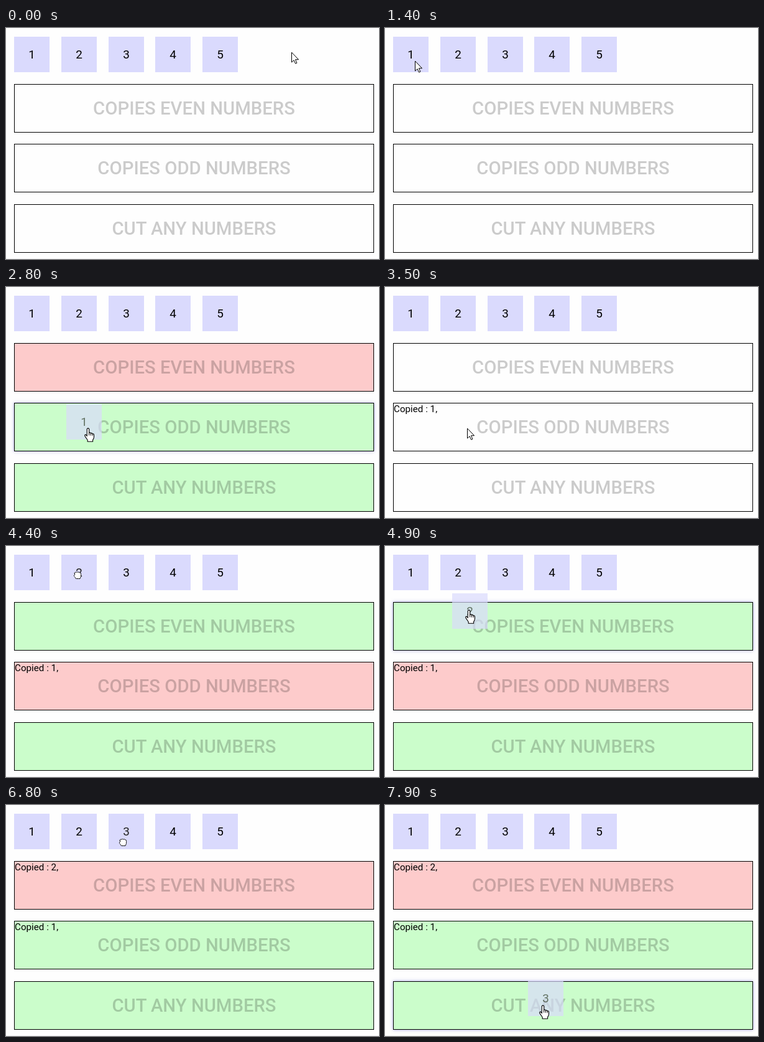
Write an HTML page that moves like this. It is 600x371 px and loops after 8 s.

```html
<!DOCTYPE html>
<html lang="en">
<head>
<meta charset="utf-8">
<title>Drag and drop numbers</title>
<style>
  html, body { margin: 0; width: 100%; height: 100%; overflow: hidden; background: #fefefe; }
  #stage {
    position: relative; width: 600px; height: 371px; overflow: hidden;
    box-sizing: border-box; border-bottom: 1px solid #f5f5f6;
    font-family: Roboto, Arial, sans-serif; cursor: default; user-select: none;
  }
  .cell {
    position: absolute; top: 14px; width: 57px; height: 57px;
    background: #dadafd; color: #000; font-size: 18.9px; line-height: 57px; text-align: center;
  }
  .ghost { left: 0; top: 0; opacity: .68; color: #333; }
  .zone {
    position: absolute; left: 13px; width: 579px; height: 78px;
    box-sizing: border-box; border: 1px solid #000;
  }
  .zone.yes { background: #cbfdcb; }
  .zone.no { background: #fdcbcb; }
  .zone.over { box-shadow: 0 0 5px rgba(90, 90, 210, .5); }
  .title {
    position: absolute; inset: 0; line-height: 76px; text-align: center; white-space: nowrap;
    font-size: 29.3px; font-weight: 500; color: rgba(0, 0, 0, .2);
  }
  .note { position: absolute; left: 0; top: 0; font-size: 15.2px; line-height: 18px; white-space: nowrap; }
  #pointer { position: absolute; left: 0; top: 0; width: 1px; height: 1px; overflow: visible; }
  #pointer path { stroke-linejoin: round; stroke-linecap: round; }
</style>
</head>
<body>
<div id="stage"></div>
<script>
const LOOP = 8000, STEP = 100;
const CELL_X = [13, 89, 165, 240, 316];
const CELL_Y = 14, CELL_SIZE = 57;
const ZONES = [
  { y: 90, title: 'COPIES EVEN NUMBERS', accepts: n => n % 2 === 0 },
  { y: 186, title: 'COPIES ODD NUMBERS', accepts: n => n % 2 === 1 },
  { y: 283, title: 'CUT ANY NUMBERS', accepts: () => true }
];

// Pointer path: time, x, y
const PATH = [
  [0, 459, 39], [100, 452, 62], [300, 395, 190], [500, 290, 312], [600, 215, 250],
  [800, 75, 88], [900, 49, 58], [1100, 48, 52], [1700, 48, 54], [1800, 50, 59],
  [1900, 57, 72], [2100, 80, 115], [2400, 103, 172], [2700, 128, 222], [2800, 132, 227],
  [3500, 132, 227], [3700, 129, 170], [3900, 119, 72], [4100, 116, 41], [4400, 116, 41],
  [4600, 121, 62], [4900, 135, 103], [5200, 140, 122], [5400, 140, 123], [5900, 140, 123],
  [6100, 160, 85], [6300, 186, 58], [6400, 189, 54], [6800, 189, 54], [7000, 197, 88],
  [7200, 208, 140], [7500, 226, 218], [7700, 242, 280], [7900, 254, 322], [8000, 254, 322]
];
const DRAGS = [
  { n: 1, start: 1500, end: 2900, zone: 1 },
  { n: 2, start: 4300, end: 5500, zone: 0 },
  { n: 3, start: 6600, end: LOOP, zone: -1 }
];

const POINTERS = {
  arrow: `<path transform="translate(.5 .5)" fill="#fff" stroke="#000"
    d="M0 0V15.5L3.6 12.2L6.1 17.7L8.4 16.7L6 11.2H10.7Z"/>`,
  hand: `<path fill="#fff" stroke="#000" stroke-width="1.1"
    d="M-1.7 1Q0-1.2 1.7 1V7.2Q3.6 5.9 4.4 8Q6.4 6.8 7.2 9Q9.3 8.2 9.5 10.8V14Q9.2 16.8 7.6 18.6V21.3H-.8V18.8
       L-5 12.6Q-5.9 10-3.7 10.1L-1.7 12.4Z"/>
    <path fill="none" stroke="#000" d="M1.7 7V11M4.4 8V11.2M7.2 9V11.5"/>`,
  fist: `<path transform="translate(-1 6)" fill="#fff" stroke="#000" stroke-dasharray="2 1"
    d="M-4.8-3.5Q-3.8-5.8-2-4.5Q-.7-6.2.8-4.6Q2.4-5.8 3.6-4Q5.6-4.4 5.6-1.8V1Q5.2 3.4 4 5.5H-2.6
       Q-3.4 3.4-5.3 1.8Q-6.3-.6-4.3-.7Z"/>`,
  deny: `<circle r="6.5" fill="#fff" fill-opacity=".65" stroke="#fff" stroke-width="3.6"/>
    <circle r="6.3" fill="none" stroke="#c51616" stroke-width="2.4"/>
    <path d="M-4.3-4.3L4.3 4.3" stroke="#c51616" stroke-width="2.4"/>`
};

const stage = document.getElementById('stage');

function add(parent, className, text = '') {
  const el = document.createElement('div');
  el.className = className;
  el.textContent = text;
  parent.append(el);
  return el;
}

for (const zone of ZONES) {
  zone.el = add(stage, 'zone');
  zone.el.style.top = zone.y + 'px';
  add(zone.el, 'title', zone.title);
  zone.note = add(zone.el, 'note');
}
CELL_X.forEach((x, i) => { add(stage, 'cell', i + 1).style.left = x + 'px'; });
const ghost = add(stage, 'cell ghost');
stage.insertAdjacentHTML('beforeend', '<svg id="pointer"></svg>');
const pointer = document.getElementById('pointer');
let shape = '';

function pointAt(t) {
  const i = PATH.findIndex(p => p[0] > t);
  const [t0, x0, y0] = PATH[i - 1], [t1, x1, y1] = PATH[i];
  const k = (t - t0) / (t1 - t0);
  return [x0 + (x1 - x0) * k, y0 + (y1 - y0) * k];
}

function place(el, x, y) {
  el.style.transform = `translate(${Math.round(x)}px, ${Math.round(y)}px)`;
}

function pointerShape(drag, over, y) {
  if (!drag) return 'arrow';
  if (over) return over.accepts(drag.n) ? 'hand' : 'deny';
  return y < CELL_Y + CELL_SIZE ? 'fist' : 'deny';
}

function draw(t) {
  const [x, y] = pointAt(t);
  const drag = DRAGS.find(d => t >= d.start && t < d.end);
  const over = drag && ZONES.find(z => y >= z.y && y < z.y + 78);

  ZONES.forEach((zone, i) => {
    const fill = drag ? (zone.accepts(drag.n) ? ' yes' : ' no') : '';
    zone.el.className = 'zone' + fill + (zone === over ? ' over' : '');
    const copied = DRAGS.filter(d => d.zone === i && t >= d.end);
    zone.note.textContent = copied.length ? 'Copied : ' + copied.map(d => d.n + ',').join(' ') : '';
  });

  ghost.style.display = drag ? 'block' : 'none';
  if (drag) {
    const [gx, gy] = pointAt(drag.start);
    ghost.textContent = drag.n;
    place(ghost, CELL_X[drag.n - 1] + x - gx, CELL_Y + y - gy);
  }

  const next = pointerShape(drag, over, y);
  if (next !== shape) pointer.innerHTML = POINTERS[shape = next];
  place(pointer, x, y);
}

const begin = performance.now();
function tick() {
  const t = (performance.now() - begin) % LOOP;
  draw(Math.floor(t / STEP) * STEP);
  requestAnimationFrame(tick);
}
tick();
</script>
</body>
</html>
```
